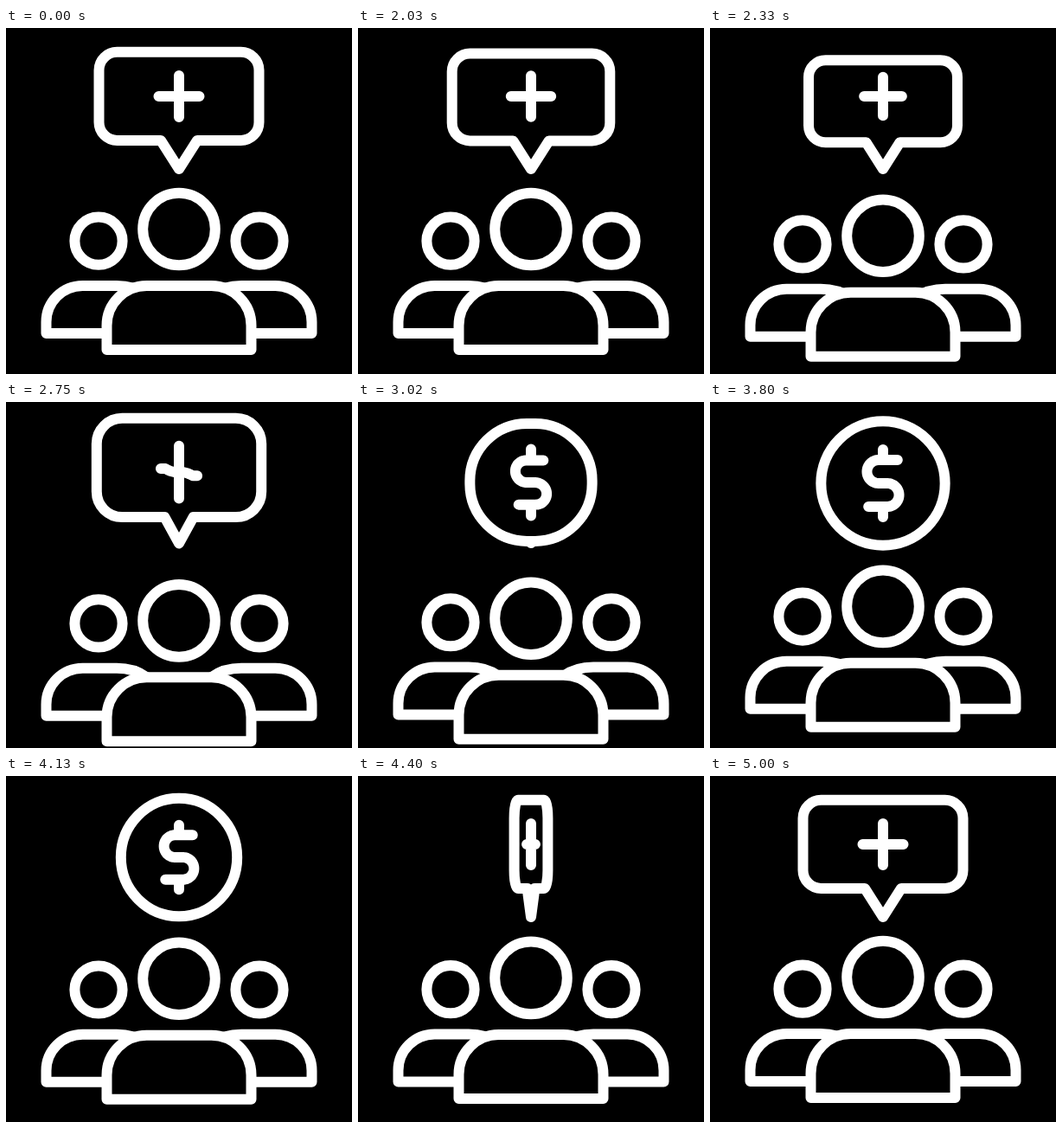
An HTML page with a canvas for the animation above (5030 ms loop, 400 px wide and 400 px high).

```html
<!DOCTYPE html>
<html lang="en">
<head>
<meta charset="utf-8">
<title>Group icon</title>
<style>
html, body { margin: 0; width: 100%; height: 100%; overflow: hidden; background: #000; }
canvas { display: block; width: 100vmin; height: 100vmin; margin: auto; }
</style>
</head>
<body>
<canvas id="stage" width="400" height="400"></canvas>
<script>
const ctx = document.getElementById('stage').getContext('2d');
const LOOP = 5030, START = 2030, STEP = 30, SWAP = 4350;

const mix = (a, b, p) => a + (b - a) * p;
const ramp = (t, from, to) => Math.max(0, Math.min(1, (t - from) / (to - from)));
const smooth = u => u * u * (3 - 2 * u);
const easeInOut = u => u < 0.5 ? 4 * u ** 3 : 1 - 4 * (1 - u) ** 3;

// How far the group is pushed down: quick drop, long recovery.
const sink = t => 21 * smooth(ramp(t, 2140, 2600)) * (1 - ramp(t, 4400, 5000))
  / (1 + Math.max(0, (t - START) / 1350) ** 5.5);

const morph = t => easeInOut(ramp(t, 2540, 3180));

const pulse = t => 1 - 0.075 * Math.sin(2 * Math.PI * Math.max(0, t - 2000) / 1080);

// Sideways turn: the coin closes, then the bubble opens.
const turnAt = t => Math.max(0.01, t < SWAP
  ? 1 - ramp(t, 4100, SWAP) ** 2
  : 1 - (1 - ramp(t, SWAP, 4800)) ** 2);

function ring(x, y, r) {
  ctx.beginPath();
  ctx.arc(x, y, r, 0, Math.PI * 2);
  ctx.stroke();
}

function sidePerson(dy, flip) {
  ctx.save();
  if (flip) { ctx.translate(400, 0); ctx.scale(-1, 1); }
  ctx.translate(0, dy);
  ring(107, 246.2, 27.6);
  ctx.stroke(new Path2D('M125 353H46.5V340A42 42 0 0 1 88.5 298H128Q148 298 162 308'));
  ctx.restore();
}

function people(dy) {
  sidePerson(dy * 0.48, false);
  sidePerson(dy * 0.48, true);
  ctx.save();
  ctx.translate(0, dy);
  ring(200, 232.5, 41.8);
  const body = new Path2D('M116.5 372V344A46 46 0 0 1 162.5 298H237.5A46 46 0 0 1 283.5 344V372Z');
  ctx.fill(body);
  ctx.stroke(body);
  ctx.restore();
}

// Shapes are squeezed sideways while the line keeps its weight.
function squeezed(x, y, sx, sy, draw) {
  ctx.save();
  ctx.translate(x, y);
  ctx.scale(sx, sy);
  ctx.beginPath();
  draw();
  ctx.restore();
  ctx.stroke();
}

// Speech bubble at m = 0, round coin at m = 1.
function frame(m, s, turn) {
  const R = 67.3, cy = 94, q = Math.PI / 2;
  const w = mix(92.5, R, m), r = mix(21, R, m);
  const top = mix(27.8, cy - R, m), bot = mix(130, cy + R, m);
  const base = 21 * (1 - m) ** 2, tip = mix(163, cy + R, m);
  const pivot = mix(163, cy, m);
  squeezed(200, pivot, s * turn, s, () => {
    ctx.translate(0, -pivot);
    ctx.moveTo(0, tip);
    ctx.lineTo(-base, bot);
    ctx.arc(r - w, bot - r, r, q, 2 * q);
    ctx.arc(r - w, top + r, r, 2 * q, 3 * q);
    ctx.arc(w - r, top + r, r, 3 * q, 4 * q);
    ctx.arc(w - r, bot - r, r, 0, q);
    ctx.lineTo(base, bot);
    ctx.closePath();
  });
}

// Point on an S curve, u from -1 (upper end) to 1 (lower end).
function essPoint(u) {
  const r = 12.7, flat = 4.7, tail = 20.5, bend = Math.PI * r;
  const side = Math.sign(u);
  const d = Math.abs(u) * (flat + bend + tail);
  if (d < flat) return [side * d, 0];
  if (d > flat + bend) return [side * (2 * flat + bend - d), side * 2 * r];
  const a = (d - flat) / r;
  return [side * (flat + r * Math.sin(a)), side * r * (1 - Math.cos(a))];
}

// Plus at m = 0, dollar at m = 1; swells a little in between.
function sign(m, s, turn) {
  const k = s * (1 + 0.8 * m * (1 - m));
  squeezed(200, mix(79, 94, m), k * turn, k, () => {
    for (let i = -40; i <= 40; i++) {
      const [x, y] = essPoint(i / 40);
      ctx.lineTo(mix(23.5 * i / 40, x, m), y * m);
    }
    for (const d of [-1, 1]) {
      ctx.moveTo(0, d * mix(24, 36.7, m));
      ctx.lineTo(0, d * mix(0, 25.4, m));
    }
  });
}

function draw(t) {
  ctx.fillStyle = '#000';
  ctx.fillRect(0, 0, 400, 400);
  ctx.strokeStyle = '#fff';
  ctx.lineWidth = 12;
  ctx.lineCap = ctx.lineJoin = 'round';
  people(sink(t));
  const turned = t >= SWAP;
  const m = turned ? 0 : morph(t), s = turned ? 1 : pulse(t);
  frame(m, s, turnAt(t));
  sign(m, s, turnAt(t));
}

let begin;
function tick(now) {
  if (begin === undefined) begin = now;
  const t = (now - begin) % LOOP;
  draw(t < START ? 0 : START + Math.floor((t - START) / STEP) * STEP);
  requestAnimationFrame(tick);
}
draw(0);
requestAnimationFrame(tick);
</script>
</body>
</html>
```
